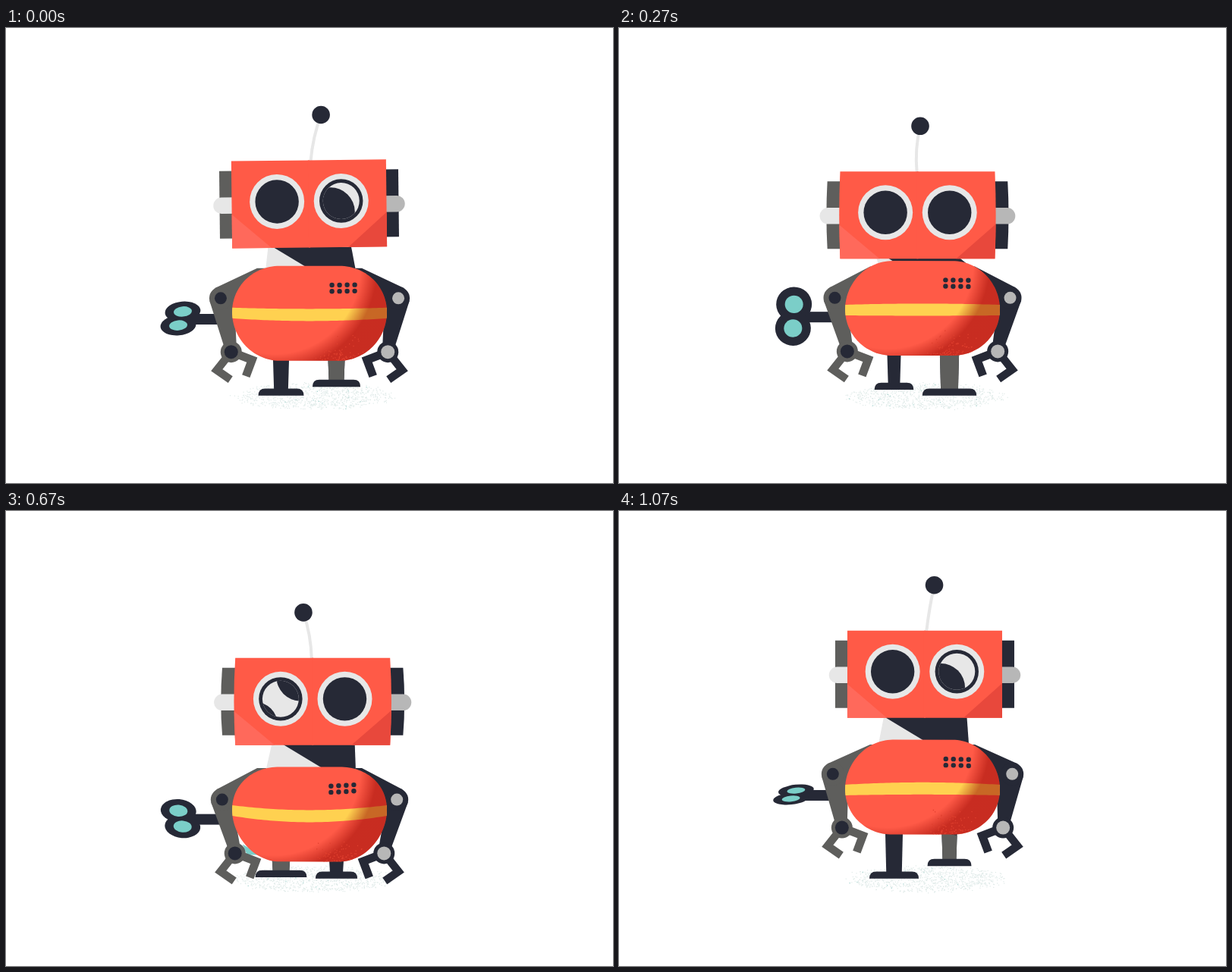
Recreate the animation shown at these times as an HTML page with a canvas. Size 800 by 600 pixels, loop 1.17 s.

```html
<!DOCTYPE html>
<html lang="en">
<head>
<meta charset="utf-8">
<title>Walking robot</title>
<style>
html, body { margin: 0; height: 100%; overflow: hidden; background: #fff; }
canvas { display: block; }
</style>
</head>
<body>
<canvas id="stage" width="800" height="600"></canvas>
<script>
const c = document.getElementById('stage').getContext('2d');
const DARK = '#262936', GRAY = '#5e5e5c', RED = '#ff5a47', LIGHT = '#e7e7e7', SILVER = '#b7b7b7', TEAL = '#7bcec8';
const CYCLE = 12, STEP = 6; // poses per loop and per footstep

const wave = (i, period, peak) => Math.cos((i - peak) * 2 * Math.PI / period);

// Everything that moves, as a function of the pose number
function poseAt(i) {
  const lean = wave(i, STEP, 1.9), lag = wave(i, STEP, 3.45), sway = wave(i, STEP, 3.9);
  const top = 313.9 + 20 * wave(i, STEP, 1.26) + 3.9 * wave(i, STEP / 2, 1.28) - 1.5 * wave(i, STEP / 3, 0);
  const crouch = ((1 + wave(i, CYCLE, 2.85)) / 2) ** 2.7;
  const spin = (i - 3.7) * Math.PI / CYCLE, facing = Math.cos(spin);
  return {
    i, top, lean,
    bend: 0.6 + 8.4 * wave(i, STEP, 1.32) + 2.8 * wave(i, STEP / 2, 2.15),
    shoulder: top + 5.1 + 4 * sway,
    elbow: [283.7 + 1.9 * lean, top + 45.7 + 3.6 * lag],
    wrist: [298.8 + 5 * lean, top + 116.4 + 3.5 * lag],
    stem: top + 72.2 + 3.5 * sway,
    keyRadius: Math.max(4, 23.3 * Math.abs(facing)),
    keyTilt: -3.6 * Math.sin(spin) * Math.sign(facing),
    headX: 400.2 + 6.8 * wave(i, CYCLE, 8.8),
    headY: top - 144.5 + 27 * crouch,
    headTurn: -0.014 * Math.max(0, wave(i, CYCLE / 2.5, -0.5)) * (wave(i, CYCLE, -0.5) > 0.9),
    bulge: Math.max(0, 5 * lean),
    neckCut: -43.7 + 9 * wave(i, STEP, 2),
    antenna: [2.2 * wave(i, CYCLE, 11.3), 6 * wave(i, CYCLE, 10.7), 1.3 + 14.5 * wave(i, CYCLE, 0.3)]
  };
}

function ellipse(x, y, rx, ry, color, turn = 0) {
  c.beginPath();
  c.ellipse(x, y, rx, ry, turn, 0, Math.PI * 2);
  c.fillStyle = color;
  c.fill();
}
const circle = (x, y, r, color) => ellipse(x, y, r, r, color);
function trace(points) {
  c.beginPath();
  points.forEach(([x, y]) => c.lineTo(x, y));
}
function poly(points, color) {
  trace(points);
  c.fillStyle = color;
  c.fill();
}
function line(points, color, width, cap = 'butt') {
  trace(points);
  c.strokeStyle = color;
  c.lineWidth = width;
  c.lineCap = cap;
  c.stroke();
}
function random(seed) {
  return () => {
    seed = (seed * 16807) % 2147483647;
    return seed / 2147483647;
  };
}

function ground(i) {
  const rnd = random(7919 * (i + 3));
  for (let n = 0; n < 900; n++) {
    const a = rnd() * Math.PI * 2, r = Math.sqrt(rnd()) * (0.8 + rnd() * 0.25);
    c.fillStyle = n % 60 ? '#dfeae8' : '#9ccfca';
    c.fillRect(405 + 108 * r * Math.cos(a), 485 + 18 * r * Math.sin(a), 1.2, 1.2);
  }
}

function windKey({ stem, keyRadius: r, keyTilt: tilt }) {
  const lobes = (rx, ry, color) => {
    for (const s of [-1, 1]) ellipse(230 - s * tilt, stem - 1 + s * r * 0.69, rx, ry, color, -tilt * 0.03);
  };
  c.fillStyle = DARK;
  c.fillRect(240, stem - 7, 55, 14);
  lobes(23.5, r, DARK);
  lobes(12, r * 0.51, TEAL);
}

// The right leg makes the same step half a loop later
function leg(mid, i, rise, top) {
  const width = 61.5 + 10 * wave(i, CYCLE, 8.7);
  const lift = rise * Math.max(0, (wave(i, CYCLE, 4.6) - 0.2) / 0.8);
  const cut = 456 - 62 * wave(i, CYCLE, 7);
  const base = 484.7 - lift, half = width * 0.18, a = mid - width / 2, b = mid + width / 2;
  c.save();
  poly([[mid - half, top], [mid + half, top], [mid + half - 1.5, base - 6], [mid - half + 1.5, base - 6]], DARK);
  c.clip();
  poly([[mid - 20, cut - 3], [mid + 20, cut + 5], [mid + 20, 600], [mid - 20, 600]], GRAY);
  c.restore();
  c.beginPath();
  c.moveTo(a, base);
  c.quadraticCurveTo(a, base - 9.3, a + 9, base - 9.3);
  c.lineTo(b - 9, base - 9.3);
  c.quadraticCurveTo(b, base - 9.3, b, base);
  c.fillStyle = DARK;
  c.fill();
}

// Drawn as the left arm; the right one is its mirror image
function arm({ top, shoulder, elbow: [ex, ey], wrist: [wx, wy] }, color, joint) {
  poly([[ex - 7, ey - 13.5], [331, shoulder], [345, shoulder], [345, top + 60], [302, top + 68],
    [wx + 7, wy - 8], [wx - 9, wy - 6], [ex - 14.5, ey + 4]], color);
  circle(ex, ey, 15, color);
  circle(wx, wy, 14, color);
  line([[wx, wy], [wx - 19, wy + 24], [wx - 1, wy + 36.5]], color, 10.5);
  line([[wx, wy], [wx + 27.5, wy + 10.5], [wx + 19.5, wy + 32]], color, 11);
  circle(ex, ey, 8, joint);
  circle(wx, wy, 9, joint);
}

function body({ i, top, bend }) {
  const sag = (x, power = 2) => bend * Math.abs((x - 400) / 102) ** power;
  const outline = [], upper = [], lower = [];
  for (let n = 0; n < 120; n++) {
    const a = n * Math.PI / 60;
    const x = 400 + 39.5 * Math.sign(Math.cos(a)) + 62.5 * Math.cos(a);
    outline.push([x, top + 62.5 + 62.5 * Math.sin(a) - sag(x, 3)]);
  }
  for (let x = 296; x <= 504; x += 4) {
    const y = top + 56.5 - sag(x);
    upper.push([x, y]);
    lower.unshift([x, y + 16 - 2 * ((x - 400) / 102) ** 2]);
  }
  c.save();
  poly(outline, RED);
  c.clip();
  poly([...upper, ...lower], '#ffd150');
  const shade = c.createRadialGradient(354, top + 3, 113, 354, top + 3, 135);
  shade.addColorStop(0, '#fff');
  shade.addColorStop(1, 'rgb(200,126,118)');
  c.globalCompositeOperation = 'multiply';
  c.fillStyle = shade;
  c.fillRect(290, top - 20, 220, 170);
  c.globalCompositeOperation = 'source-over';
  const rnd = random(331 * (i + 2));
  c.fillStyle = '#e0402f';
  for (let n = 0; n < 110; n++) {
    c.fillRect(440 + (rnd() + rnd() - 1) * 35, top + 126 - rnd() * rnd() * 38, 1.3, 1.3);
  }
  c.restore();
  for (let n = 0; n < 8; n++) {
    const x = 430 - bend / 4 + (n % 4) * 10;
    circle(x, top + 25.3 + (n >> 2) * 8.2 - sag(x), 3.2, DARK);
  }
}

function neck({ top, headX: x, headY, neckCut }) {
  const y = headY + 114, end = top + 6, cut = x + neckCut;
  c.save();
  poly([[x - 54, y], [x + 55.5, y], [461, end], [342, end]], LIGHT);
  c.clip();
  poly([[cut, y], [cut + 83, y + 50], [520, y + 50], [520, y]], DARK);
  c.restore();
}

function barrel(half, height, puff, color, sides = [-1, 1]) {
  for (const s of sides) {
    c.beginPath();
    c.moveTo(-s, -height);
    c.lineTo(s * half, -height);
    c.quadraticCurveTo(s * (half + puff), 0, s * half, height);
    c.lineTo(-s, height);
    c.fillStyle = color;
    c.fill();
  }
}

// A reflection crosses the eye diagonally, between two round dark edges
function eye(x, phase) {
  c.save();
  c.translate(x, -3.5);
  circle(0, 0, 36, LIGHT);
  circle(0, 0, 28.7, DARK);
  if (phase >= 0 && phase < 5) {
    circle(0, 0, 24, LIGHT);
    c.clip();
    c.rotate(Math.PI / 4);
    circle(-2, 10.6 - 18 * phase - 32, 32, DARK);
    circle(0, 28 - 10 * phase + 32, 32, DARK);
  }
  c.restore();
}

function head({ i, headX, headY, headTurn, bulge, antenna: [root, curve, tip] }) {
  c.save();
  c.translate(headX, headY + 57.5);

  c.beginPath();
  c.moveTo(root, -56);
  c.quadraticCurveTo(curve, -88, tip, -117);
  c.strokeStyle = LIGHT;
  c.lineWidth = 4;
  c.stroke();
  circle(tip, -117.5, 11.8, DARK);

  c.rotate(headTurn);
  for (const [s, ear, knob] of [[-1, GRAY, LIGHT], [1, DARK, SILVER]]) {
    barrel(118 + bulge * 0.4, 44.5, bulge * 1.2, ear, [s]);
    line([[0, 1], [s * (115.5 + bulge * 1.3), 1]], knob, 21.5, 'round');
  }
  barrel(102, 57.5, bulge * 1.2, RED);
  const edge = 102 + bulge * 0.5;
  poly([[-edge, 13], [-50, 57.5], [-102, 57.5]], '#ff695b');
  poly([[edge, 12], [51, 57.5], [102, 57.5]], '#e8483c');
  eye(-42.3, i - 6);
  eye(42.3, (i + 4) % CYCLE);
  c.restore();
}

function draw(i) {
  const pose = poseAt(i), hip = pose.top + 115;
  c.clearRect(0, 0, 800, 600);
  ground(i);
  windKey(pose);
  leg(362.5, i, 13, hip);
  leg(435.5, i + STEP, 17, hip);
  if (pose.lean > 0.5) {
    const [x, y] = pose.wrist;
    poly([[x + 10, y - 12], [x + 34, y + 2], [x + 16, y + 2]], TEAL);
  }
  arm(pose, GRAY, DARK);
  c.save();
  c.translate(800, 0);
  c.scale(-1, 1);
  arm(pose, DARK, SILVER);
  c.restore();
  neck(pose);
  body(pose);
  head(pose);
}

const start = performance.now();
function tick() {
  const t = (performance.now() - start) % 1170;
  draw(Math.floor((t + 30) / 100)); // the first pose is held 30 ms shorter
  requestAnimationFrame(tick);
}
tick();
</script>
</body>
</html>
```
